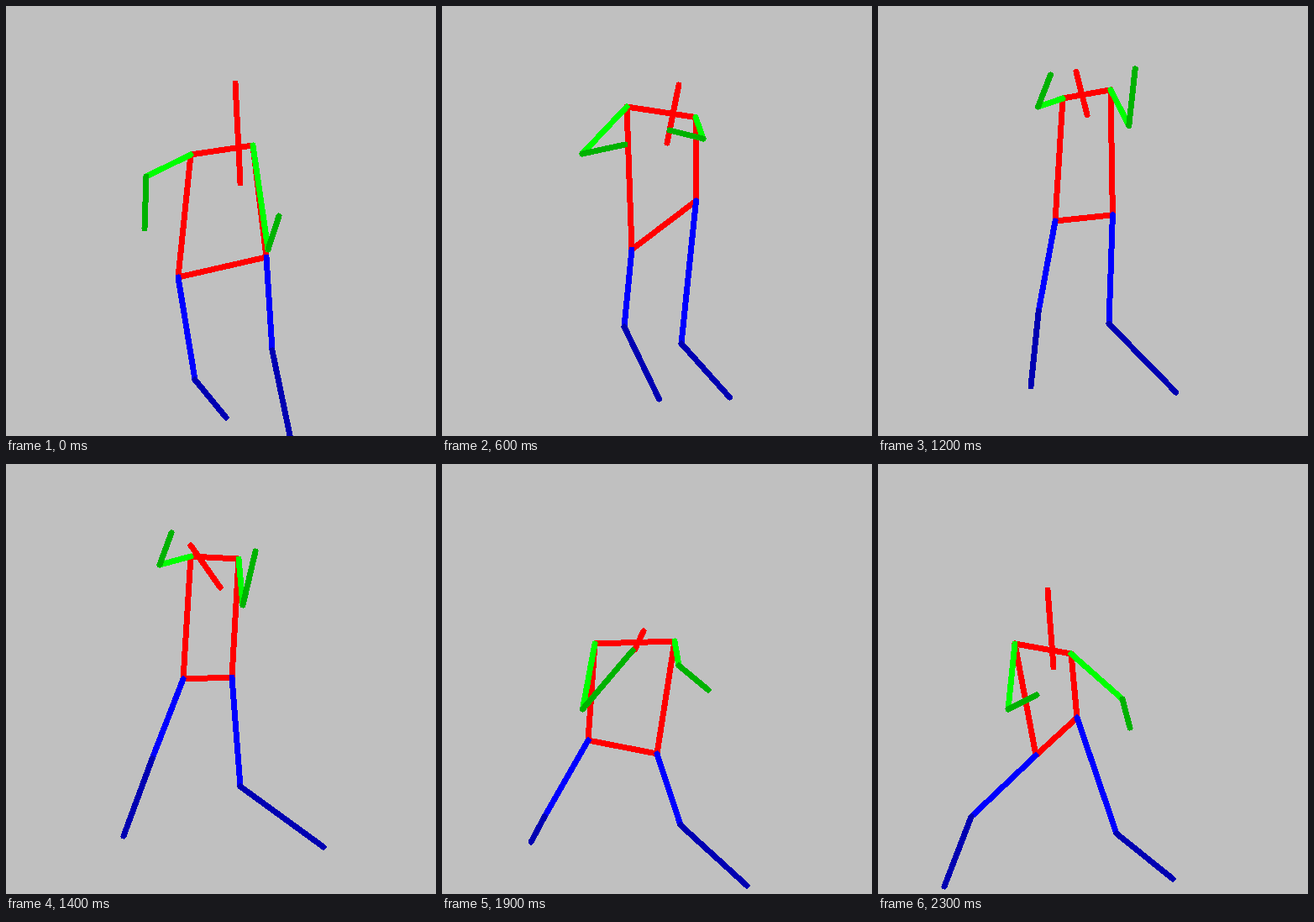
An HTML page that plays this animation: 512 by 512 pixels, repeating every 2.4 s.

```html
<!DOCTYPE html>
<html>
<head>
<meta charset="utf-8">
<title>Walking stick figure</title>
<style>
  html, body { margin: 0; width: 100%; height: 100%; overflow: hidden; background: #c0c0c0; }
  svg { display: block; width: 100vmin; height: 100vmin; }
  polyline { fill: none; stroke-width: 7; stroke-linecap: round; stroke-linejoin: round; }
</style>
</head>
<body>
<svg id="stage" viewBox="0 0 512 512" shape-rendering="crispEdges"></svg>
<script>
const stage = document.getElementById('stage');
const STEP = 100, STEPS = 24;

// The pose at step t: each joint starts somewhere and shifts with the phases of the walk.
function pose(t) {
  const phase = (from, to) => Math.min(1, Math.max(0, (t - from) / (to - from)));
  const settle = phase(0, 3), lift = phase(3, 6), reach = phase(6, 9), climb = phase(3, 9);
  const turn = phase(9, 14), drop = phase(14, 19), push = phase(19, 23), stride = phase(14, 23);
  return {
    crown: [273 + 9 * lift - 22 * reach - 40 * turn + 20 * drop - 38 * push,
            92 + 46 * settle - 88 * climb + 47 * turn + 102 * drop - 49 * push],
    chin: [279 - 30 * settle + 19 * lift - 28 * reach + 15 * turn - 46 * stride,
           211 - 16 * settle - 32 * lift - 59 * reach + 43 * turn + 74 * drop + 21 * push],

    shoulderL: [220 - 38 * drop - 19 * push,
                177 - 57 * lift - 10 * reach + 104 * drop],
    elbowL: [167 + 35 * reach - 19 * turn - 28 * stride,
             203 + 29 * settle - 112 * climb + 172 * drop],
    handL: [165 + 34 * settle + 19 * lift - 21 * turn + 30 * drop - 38 * push,
            265 + 34 * settle - 134 * lift - 83 * reach + 140 * drop + 53 * push],
    hipL: [205 + 36 * settle - 30 * climb - 37 * drop + 14 * push,
           323 - 26 * settle - 7 * lift - 34 * reach + 73 * drop + 18 * push],
    kneeL: [225 + 10 * settle - 18 * lift - 43 * turn - 52 * drop - 11 * push,
            445 - 35 * settle - 28 * lift - 31 * turn + 69 * drop],
    footL: [262 + 10 * settle - 27 * climb - 105 * turn - 61 * stride,
            490 - 22 * lift - 25 * turn + 7 * drop + 53 * push],

    shoulderR: [294 + 33 * settle - 50 * climb - 47 * push,
                166 + 19 * settle - 105 * climb + 33 * turn + 98 * drop + 15 * push],
    elbowR: [312 + 31 * settle - 32 * lift + 13 * reach - 42 * turn + 9 * push,
             290 - 46 * settle - 86 * lift - 54 * reach + 64 * turn + 72 * drop + 40 * push],
    handR: [325 - 30 * settle - 24 * lift + 49 * reach - 23 * turn + 20 * drop - 17 * push,
            250 - 30 * settle - 72 * lift - 117 * reach + 73 * turn + 165 * drop + 45 * push],
    hipR: [310 - 15 * climb - 26 * turn - 13 * drop - 19 * push,
           299 - 67 * lift + 9 * reach + 13 * turn + 91 * drop - 43 * push],
    kneeR: [317 - 32 * lift - 16 * reach + 10 * turn + 5 * drop,
            410 + 24 * settle - 64 * climb + 14 * turn + 46 * drop + 10 * push],
    footR: [339 + 26 * settle - 45 * climb + 58 * turn - 27 * stride,
            516 - 16 * settle - 34 * lift - 10 * turn + 46 * drop - 8 * push],
  };
}

const limb = (side, a, b, color) => [color, a + side, b + side];
const limbs = side => [
  limb(side, 'shoulder', 'elbow', '#0f0'),
  limb(side, 'elbow', 'hand', '#00b200'),
  limb(side, 'hip', 'knee', '#00f'),
  limb(side, 'knee', 'foot', '#0000b2'),
];
const bones = [
  ['#f00', 'crown', 'chin'],
  ['#f00', 'shoulderL', 'shoulderR', 'hipR', 'hipL', 'shoulderL'],
  ...limbs('L'),
  ...limbs('R'),
].map(([color, ...joints]) => {
  const line = document.createElementNS(stage.namespaceURI, 'polyline');
  line.setAttribute('stroke', color);
  stage.append(line);
  return { line, joints };
});

const start = performance.now();
function draw() {
  const at = pose(Math.floor((performance.now() - start) / STEP) % STEPS);
  for (const { line, joints } of bones) {
    line.setAttribute('points', joints.map(name => at[name]).join(' '));
  }
  requestAnimationFrame(draw);
}
draw();
</script>
</body>
</html>
```
